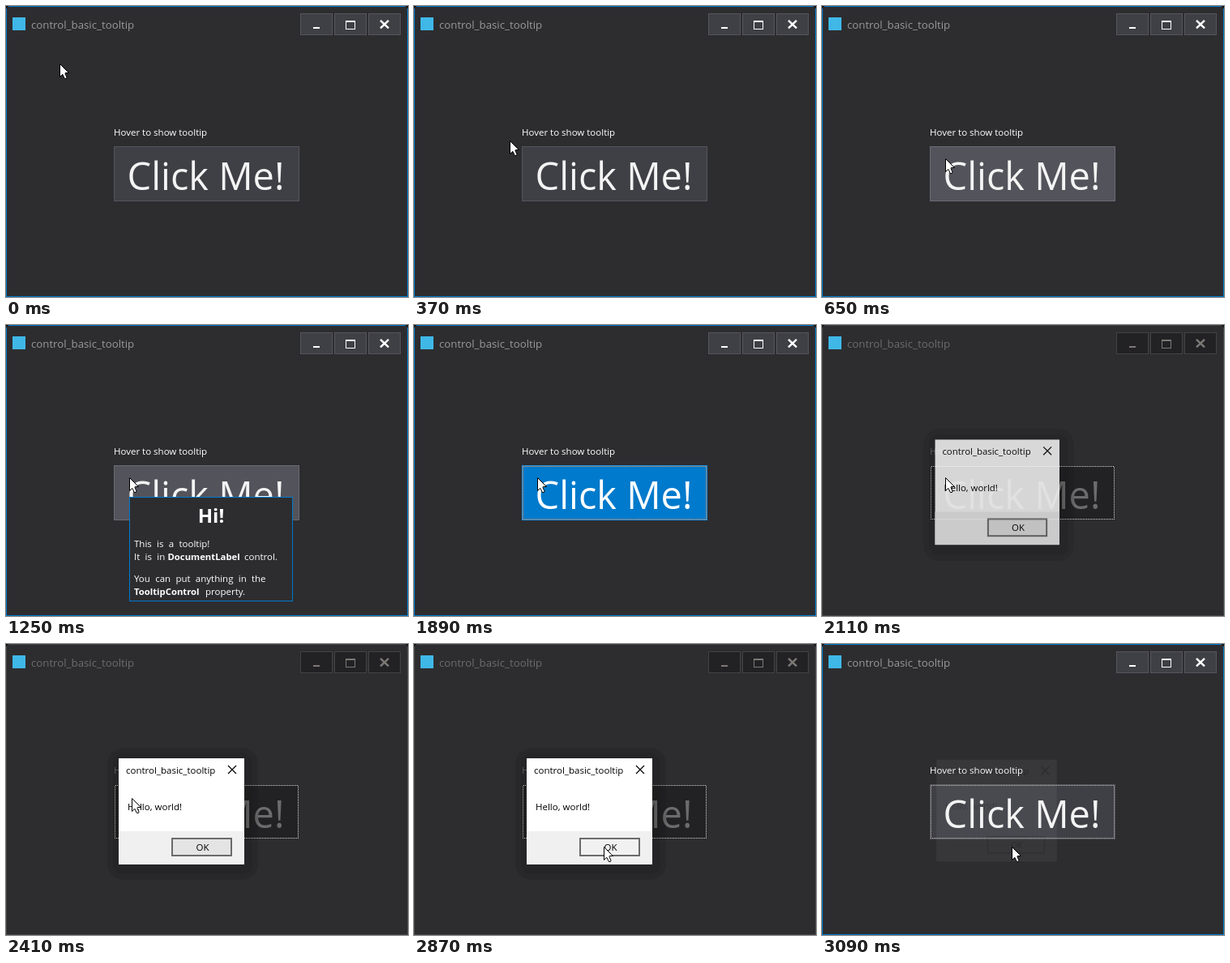
Animation, 496 px wide and 359 px high, one loop 3.96 s. Source, as an HTML page:

```html
<!DOCTYPE html>
<html lang="en">
<head>
<meta charset="utf-8">
<title>control_basic_tooltip</title>
<style>
  html, body { margin: 0; width: 100%; height: 100%; overflow: hidden; background: #2d2d30; }
  svg { display: block; width: 496px; height: 359px; }
  text { font: 11.5px "Open Sans", "Noto Sans", sans-serif; white-space: pre; }
  .title { font-size: 13.25px; }
  .big { font-size: 47px; }
  .head { font-size: 24px; font-weight: 700; }
  .bold { font-weight: 700; font-size: 11.3px; }
  .wide { word-spacing: 3.3px; }
  .dots { fill: none; stroke-dasharray: 1 1; shape-rendering: crispEdges; }
</style>
</head>
<body>
<svg id="stage" viewBox="0 0 496 359"></svg>
<script>
const LOOP = 3960;

// Pixel-aligned box with a 1px inner border
const box = (x, y, w, h, fill, line) =>
  `<rect x="${x + .5}" y="${y + .5}" width="${w - 1}" height="${h - 1}" fill="${fill}" stroke="${line}"/>`;
const text = (x, y, s, fill, cls = '', extra = '') =>
  `<text x="${x}" y="${y}" fill="${fill}" class="${cls}" ${extra}>${s}</text>`;

// Focus ring: every other pixel, in a checkerboard phase
const dots = color =>
  `<path class="dots" stroke="${color}" d="M135 174.5H361M360.5 175V240M134 239.5H361M134.5 175V240"/>`;

const button = (c, id = '') => `<g id="${id}">
  ${box(133, 173, 229, 68, c.face, c.edge)}
  ${c.focus ? dots(c.focus) : ''}
  ${text(149.5, 227, 'Click Me!', c.text, 'big')}</g>`;

const frame = c => `
  ${box(0, 0, 496, 359, '#2d2d30', c.border)}
  <path d="M0 0h3v1h-2v2h-1zM496 0h-3v1h2v2h1z" fill="#111"/>
  <rect x="8" y="14" width="16" height="16" fill="#3fb8e8"/>
  ${text(31, 28, 'control_basic_tooltip', c.title, 'title')}
  ${[363, 405, 447].map(x => box(x, 9, 40, 27, c.face, c.edge)).join('')}
  <path d="M379 27h8" stroke="${c.glyph}" stroke-width="2"/>
  <path d="M419 18h12v11h-12z M420 20v8h10v-8z" fill="${c.glyph}" fill-rule="evenodd"/>
  <path d="M462 17.8l10 9.6M472 17.8l-10 9.6" stroke="${c.glyph}" stroke-width="2.5"/>
  ${text(133, 160, 'Hover to show tooltip', c.label)}`;

const active = { border: '#007acc', title: '#999', face: '#3f3f46', edge: '#55555c', glyph: '#fff', label: '#fff' };
const idle = { border: '#434346', title: '#6c6c6c', face: '#222225', edge: '#434346', glyph: '#7c7874', label: '#6c6c6c' };

const looks = {
  normal: { face: '#3f3f46', edge: '#55555c', text: '#f4f4f4' },
  hover: { face: '#53535b', edge: '#6a6a75', text: '#f4f4f4' },
  pressed: { face: '#007acc', edge: '#1c97ea', text: '#fff', focus: '#ff8533' },
  focused: { face: '#3f3f46', edge: '#55555c', text: '#f4f4f4', focus: '#c0c0b9' },
  idle: { face: '#222225', edge: '#2a2a2d', text: '#6c6c6c', focus: '#ddddda' }
};

const tooltip = `<g id="tooltip">
  ${box(152, 212, 202, 129, '#2d2d30', '#007acc')}
  ${text(253, 244, 'Hi!', '#fff', 'head', 'text-anchor="middle"')}
  ${text(158, 274, 'This is a tooltip!', '#fff', 'wide')}
  ${text(158, 290, 'It is in', '#fff', 'wide')}
  ${text(199.5, 290, 'DocumentLabel', '#fff', 'bold')}
  ${text(294, 290, 'control.', '#fff')}
  ${text(158, 317, 'You can put anything in the', '#fff', 'wide')}
  ${text(158, 333, 'TooltipControl', '#fff', 'bold')}
  ${text(246, 333, 'property.', '#fff')}</g>`;

const dialog = `
  <g id="shadow" opacity="0">
    <rect x="125" y="128" width="186" height="163" rx="20" fill="#000" opacity=".1"/>
    <rect x="132" y="135" width="172" height="149" rx="12" fill="#000" opacity=".08"/>
  </g>
  <g id="dialog" opacity="0">
    <rect x="139" y="141" width="155" height="131" fill="#fff"/>
    <rect x="139" y="231" width="155" height="41" fill="#f0f0f0"/>
    ${text(148, 160, 'control_basic_tooltip', '#000')}
    <path d="M274 150l10 10M284 150l-10 10" stroke="#000" stroke-width="1.2"/>
    ${text(150, 205, 'Hello, world!', '#000')}
    <rect x="205" y="240" width="73" height="21" fill="#e4e4e4" stroke="#6b6b6b" stroke-width="2"/>
    <rect id="okHover" x="206" y="241" width="71" height="19" fill="#f1f1f1"/>
    ${text(242.5, 255, 'OK', '#000', '', 'text-anchor="middle"')}
  </g>`;

const arrow = `<path id="cursor" d="M.5 .5V16.5L3.8 13.3 6.4 18.5H8.4L9 17 7 12.5 7.3 11.5H11.5Z"
  fill="#fff" stroke="#000" stroke-linejoin="round"/>`;

const stage = document.getElementById('stage');
stage.innerHTML = frame(active)
  + ['normal', 'hover', 'pressed', 'focused'].map(k => button(looks[k], k)).join('')
  + `<g id="idle">${frame(idle)}${button(looks.idle)}</g>`
  + tooltip + dialog + arrow;

const $ = id => document.getElementById(id);
const clamp = v => Math.max(0, Math.min(1, v));
const show = (id, v) => $(id).setAttribute('opacity', v);

// Progress from 0 to 1 in n equal jumps, the first one at time a
const steps = (t, a, b, n) => t < a ? 0 : clamp((Math.floor((t - a) / (b - a) * (n - 1) + 1e-6) + 1) / n);
const easeOut = p => 1 - (1 - p) * (1 - p);
const smooth = p => p * p * (3 - 2 * p);
const curve = (p, a, b, c) => (1 - p) * (1 - p) * a + 2 * p * (1 - p) * b + p * p * c;

// Last row whose time has come
const at = (t, rows) => rows.reduce((last, row) => t >= row[0] ? row : last);

function cursorAt(t) {
  if (t < 610) {
    const p = easeOut(steps(t, 80, 570, 13));
    return [curve(p, 66, 41, 146), curve(p, 71, 130, 182)];
  }
  if (t < 650) return [149, 185];
  const p = smooth(steps(t, 2410, 2870, 9));
  return [152 + 82 * p, 188 + 62 * p];
}

// time, opacity, scale, inactive amount
const popup = [
  [0, 0, .9, 0],
  [2030, .12, .95, .35],
  [2070, .5, .975, .75],
  [2110, .82, .99, 1],
  [2160, .92, .996, 1],
  [2190, .97, .999, 1],
  [2230, 1, 1, 1],
  [3000, .7, .99, .6],
  [3040, .3, .975, .25],
  [3090, .05, .957, 0]
];

function draw(t) {
  const [x, y] = cursorAt(t).map(Math.round);
  $('cursor').setAttribute('transform', `translate(${x} ${y})`);

  show('hover', t < 1890 ? steps(t, 450, 565, 4) : 0);
  show('pressed', t >= 1890 && t < 2070 ? 1 : 0);
  show('focused', t >= 2070 ? 1 : 0);
  show('tooltip', t >= 1250 && t < 1890 ? 1 : 0);

  const [, alpha, size, dim] = at(t, popup);
  show('idle', dim);
  show('shadow', t < 3000 ? alpha : alpha * dim);
  show('dialog', alpha);
  $('dialog').setAttribute('transform',
    `translate(193 183) scale(${size}) translate(-193 -183)`);
  show('okHover', steps(t, 2755, 2870, 3));
}

const start = performance.now();
function tick(now) {
  draw(Math.max(0, now - start) % LOOP);
  requestAnimationFrame(tick);
}
draw(0);
requestAnimationFrame(tick);
</script>
</body>
</html>
```
